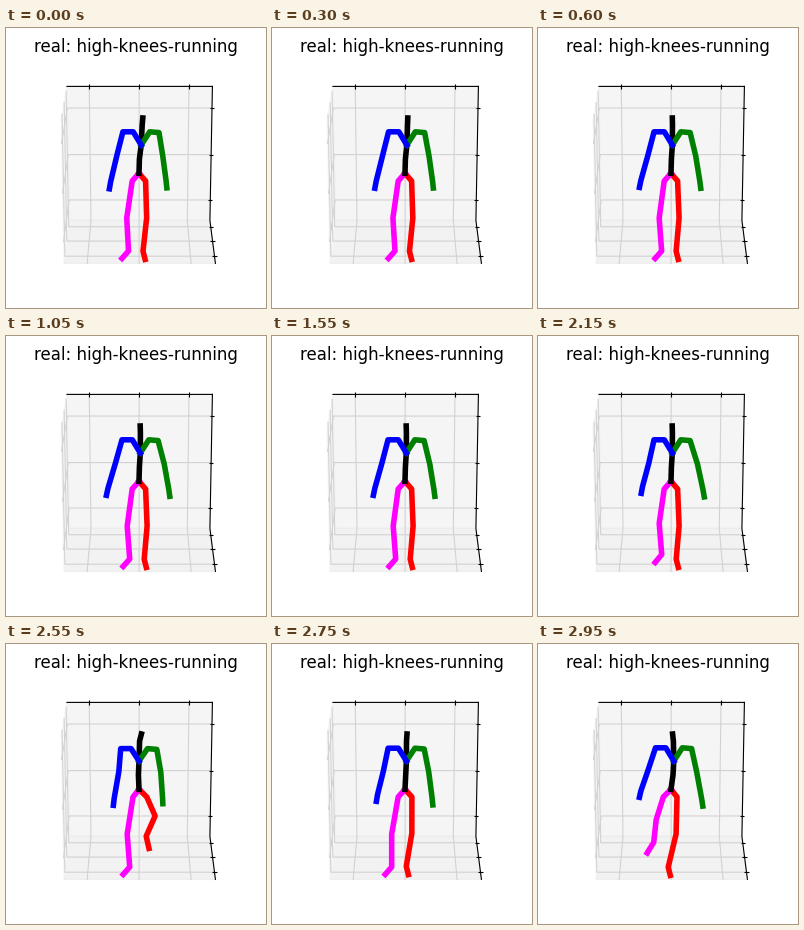
These frames come from a looping animation (260 by 280 pixels, 3 s). A matplotlib script:

```python
import numpy as np
import matplotlib.pyplot as plt
from matplotlib.animation import FuncAnimation

W, H, DPI = 260, 280, 100
FRAMES, INTERVAL = 60, 50

fig = plt.figure(figsize=(W / DPI, H / DPI), dpi=DPI, facecolor="white")
ax = fig.add_axes([0, 0, 1, 1])
ax.set_xlim(0, W)
ax.set_ylim(H, 0)
ax.axis("off")


# --- room in perspective: u to the right, h upwards, d towards the viewer ---
def project(u, h, d):
    depth = 1 / 140 - 0.000246 * h - 0.00052 * d
    x = 133.7 + 1.003 * (u - 0.5) / depth
    y = (192 / 140 - 0.9714 * h + 0.1849 * d) / depth
    return x, y + 0.4


def pane(corners, shade):
    color = (shade, shade, shade, 0.5)
    ax.add_patch(plt.Polygon([project(*c) for c in corners], closed=False,
                             fc=color, ec=color, lw=1, zorder=1))


def edge(points, color, z):
    ax.plot(*zip(*[project(*p) for p in points]), color=color, lw=0.8,
            zorder=z, snap=False)


def tick(x, y, dx, dy):
    ax.plot([x - dx, x + dx], [y - dy, y + dy], color="black", lw=0.8,
            zorder=3, solid_capstyle="butt")


pane([(0, 0, 0), (0, 1, 0), (0, 1, 1), (0, 0, 1)], 0.95)
pane([(0, 0, 0), (1, 0, 0), (1, 0, 1), (0, 0, 1)], 0.90)
pane([(0, 0, 0), (1, 0, 0), (1, 1, 0), (0, 1, 0)], 0.925)

GRID = "#d2d2d2"
for s in (0.157, 0.5, 0.843):
    u = s - 0.004
    edge([(u, 1, 0), (u, 0, 0), (u, 0, 1)], GRID, 2)
    edge([(1, s, 0), (0, s, 0), (0, s, 1)], GRID, 2)
    edge([(0, 1, s), (0, 0, s), (1, 0, s)], GRID, 2)
    tick(*project(u, 1, 0), 0, 2.2)
    tick(*project(1, s, 0), 2.2, 0)
    tick(*project(1, 0, s), 2.2, 0)

edge([(0, 1, 0), (1, 1, 0)], "black", 3)
edge([(1, 1, 0), (1, 0, 0), (1, 0, 1)], "black", 3)

ax.text(W / 2, 24.5, "real: high-knees-running", fontsize=12, ha="center",
        va="baseline", family="DejaVu Sans")


# --- motion: a standing figure that settles, waits and starts to run ---
def pulse(f, center, width):
    """Smooth bump: 1 at the center, 0 beyond the width."""
    s = min(abs(f - center) / width, 1)
    return np.cos(np.pi / 2 * s) ** 2


def leg(hip, stand, lift, lean, out):
    """Raise knee, ankle and toe; lean swings the lower joints to the left."""
    (kx, ky), (ax_, ay), (tx, ty) = stand
    return [PELVIS, hip,
            (kx + out * lift - 3 * lean, ky - 18 * lift),
            (ax_ + out * lift / 4 - 8 * lean, ay - 31 * lift),
            (tx + out * lift / 3 - 8 * lean, ty - 27 * lift)]


def arm(neck, shoulder, hang, tuck, shift, rise):
    """Move a hanging arm; the hand follows fully, the elbow only partly."""
    joints = [(x + w * (tuck + shift), y - v * rise)
              for (x, y), w, v in zip(hang, (0.5, 0.9, 1), (0.1, 0.9, 1))]
    return [neck, *shoulder] + joints


PELVIS = (133, 145.3)
PINK_STAND = [(121.2, 190), (123.7, 223), (117.2, 230.4)]
RED_STAND = [(141.1, 190), (138.2, 223.2), (140.3, 231.4)]
BLUE_HANG = [(109.6, 127.4), (102.4, 152.3), (100.9, 159.3)]
GREEN_HANG = [(158, 128), (162.3, 153), (163.3, 160.3)]


def pose(f):
    settle = pulse(f, 0, 14)
    swing = pulse(f, 43.5, 6)
    crouch = pulse(f, 51, 8)
    push = pulse(f, 59, 8)
    lean = push + 0.15 * settle
    pink_lift = pulse(f, 46, 4) + pulse(f, 60.5, 5)
    red_lift = pulse(f, 51, 4.5)

    nx = 134.3 + 0.9 * settle - 1.3 * crouch + 1.5 * push
    neck = (nx, 117)
    spine = (133.4 - crouch + 1.6 * push, 131)
    head = (134.4 + 1.8 * settle - 0.8 * crouch + push, 97)
    crown = (134.2 + 2.6 * settle + 1.2 * crouch + 0.4 * push, 90)
    top = 103.8 + 0.8 * crouch

    tuck = 3 * settle + 6 * crouch - 0.5 * np.cos(np.pi * f / 10)
    shift = 2.7 * swing + push
    rise = 2 * swing + 6 * push - 2 * crouch - 1.5 * settle

    return [
        leg((139.6 + 1.2 * crouch - 0.6 * push, 153), RED_STAND, red_lift, lean, 8),
        leg((126.2 + 0.8 * crouch - 0.9 * push, 153), PINK_STAND, pink_lift, lean, 0),
        [PELVIS, spine, neck, head, crown],
        arm(neck, [(nx + 8.5, top), (nx + 17.8, top + 0.8)],
            GREEN_HANG, -tuck, shift, -0.3 * rise),
        arm(neck, [(nx - 8, top), (nx - 18.3, top)],
            BLUE_HANG, tuck, shift, rise),
    ]


limbs = [ax.plot([], [], color=c, lw=4, zorder=5 + i)[0]
         for i, c in enumerate(("red", "magenta", "black", "green", "blue"))]


def draw(f):
    for line, points in zip(limbs, pose(f)):
        line.set_data(*zip(*points))
    return limbs


anim = FuncAnimation(fig, draw, frames=FRAMES, interval=INTERVAL,
                     repeat=True, repeat_delay=0)
plt.show()
```
